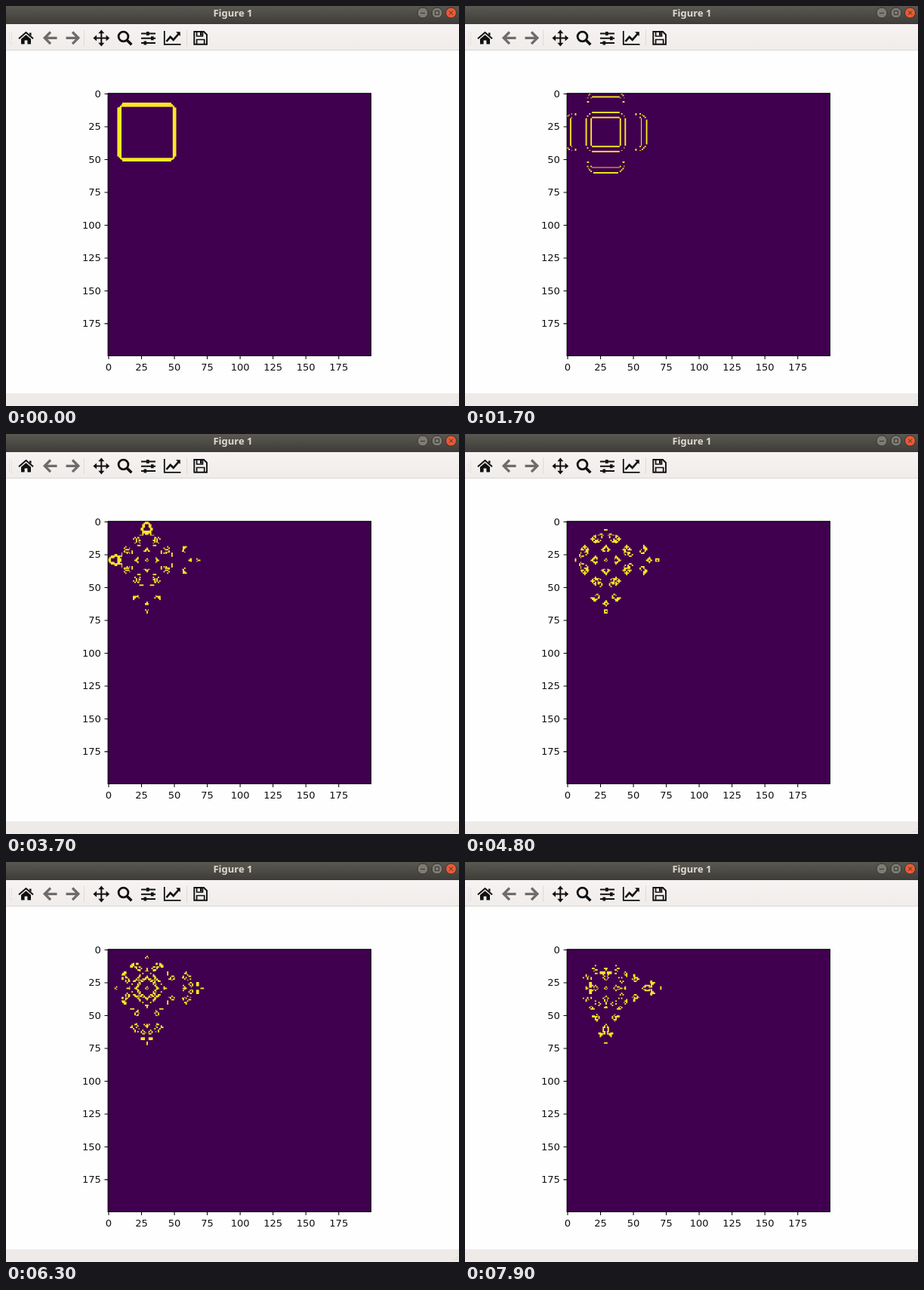
Recreate the animation shown at these times as an HTML page with a canvas. Size 600 by 530 pixels, loop 8000 ms.

```html
<!DOCTYPE html>
<html lang="en">
<head>
<meta charset="utf-8">
<title>Figure 1</title>
<style>
  html, body { margin: 0; width: 600px; height: 530px; overflow: hidden; background: #fefefe; }
  svg, canvas { position: absolute; left: 0; top: 0; display: block; }
  .title { font: bold 13px "Noto Sans", "Open Sans", sans-serif; fill: #dfdbd2; text-anchor: middle; }
  .tick { font: 13.08px "DejaVu Sans", sans-serif; fill: #111; }
</style>
</head>
<body>
<canvas id="plot" width="600" height="530"></canvas>
<svg id="ui" width="600" height="530" fill="none">
  <defs>
    <linearGradient id="bar" x2="0" y2="1">
      <stop stop-color="#5a5851"/><stop offset="1" stop-color="#3d3c38"/>
    </linearGradient>
    <linearGradient id="tools" x2="0" y2="1">
      <stop stop-color="#f6f3f2"/><stop offset="1" stop-color="#efecea"/>
    </linearGradient>
  </defs>
  <rect width="600" height="24" fill="url(#bar)"/>
  <text class="title" x="300.5" y="14">Figure 1</text>
  <g stroke="#35342f">
    <circle cx="552" cy="9" r="7" fill="#7d7b73"/>
    <circle cx="571" cy="9" r="7" fill="#7d7b73"/>
    <circle cx="589.5" cy="9" r="7" fill="#ea5a35"/>
    <path d="M549 9.5h6M568.5 6.5h5v5h-5zM587 6.5l5 5m0-5l-5 5"/>
  </g>
  <rect y="24" width="600" height="35" fill="url(#tools)"/>
  <path d="M0 58.5H600" stroke="#dad7d3"/>
  <path d="M103.5 32V53M239.5 32V53" stroke="#dedbd7"/>
  <path d="M4.5 34V52M7.5 35V52" stroke="#d0ccc7" stroke-dasharray="1 2"/>
  <path d="M67.5 42.3H51.5M59 34.5l-7.8 7.8l7.8 7.8M79.5 42.3H95.5M88 34.5l7.8 7.8l-7.8 7.8"
        stroke="#6c6c6c" stroke-width="3.3"/>
  <g stroke="#111" stroke-width="2">
    <path d="M17 43.3L26.5 35L36 43.3"/>
    <path d="M20 43.8L26.5 38.2L33 43.8V50.5H28.4V45.5H24.6V50.5H20zM31 35.5h2.5v4l-2.5-2z" fill="#111" stroke="none"/>
    <path d="M126.3 34V51M118 42.5H135"/>
    <path d="M126.3 31.6l4 4.6h-8zM126.3 53.4l4-4.6h-8zM115.4 42.5l4.6-4v8zM137.2 42.5l-4.6-4v8z" fill="#111" stroke="none"/>
    <circle cx="155.5" cy="40.5" r="6.4" stroke-width="2.8"/>
    <path d="M160 45l6.3 6.3" stroke-width="3.6"/>
    <path d="M179 36.5H198M179 42.7H198M179 49H198" stroke-width="1.9"/>
    <path d="M186 34h3.6v5H186zM192 40.2h3.6v5H192zM182.5 46.5h3.6v5h-3.6z" fill="#111" stroke="none"/>
    <path d="M209.8 33V50.8H231.5" stroke-width="1.8"/>
    <path d="M212.5 47l5.2-6 4 3.8 7-8" stroke-width="2.6"/>
    <path d="M225 34.3h5.8v5.8z" fill="#111" stroke="none"/>
    <path d="M249.3 34H262l4 4V50.8H249.3z" stroke-width="1.9"/>
    <path d="M252.6 34.5V40H260.5V34.5M252.6 50V44.5H262.7V50" stroke-width="1.7"/>
    <path d="M257 35h2.5v4H257z" fill="#111" stroke="none"/>
  </g>
  <rect y="513.3" width="600" height="17" fill="#edeae7"/>
  <path d="M597.5 523v6M594.5 526v3" stroke="#c9c5c0" stroke-dasharray="1 2"/>
</svg>
<script>
const SIZE = 200, LOOP = 8000, FRAME = 100;
const FIRST = 2, STEP = 190, LEAD = 100;
const BOX = { x: 135.1, y: 115.7, w: 348.3, h: 347.8 };
const DARK = '#40004f', LIGHT = '#fde725';

// Life on a bounded board, cells outside count as dead
function evolve(cells) {
  const next = new Uint8Array(SIZE * SIZE);
  for (let y = 0; y < SIZE; y++) {
    for (let x = 0; x < SIZE; x++) {
      let sum = 0;
      for (let v = Math.max(0, y - 1); v <= Math.min(SIZE - 1, y + 1); v++)
        for (let u = Math.max(0, x - 1); u <= Math.min(SIZE - 1, x + 1); u++)
          sum += cells[v * SIZE + u];
      const alive = cells[y * SIZE + x];
      next[y * SIZE + x] = sum === 3 || (alive && sum === 4) ? 1 : 0;
    }
  }
  return next;
}

const generation = time => FIRST + Math.floor((time + LEAD) / STEP);

// A filled square of 41 cells seeds the board
const start = new Uint8Array(SIZE * SIZE);
for (let y = 9; y < 50; y++) start.fill(1, y * SIZE + 9, y * SIZE + 50);
const history = [start];
for (let g = generation(LOOP); g > 0; g--) history.push(evolve(history[history.length - 1]));

function makeCanvas(size) {
  const c = document.createElement('canvas');
  c.width = c.height = size;
  return c.getContext('2d');
}
const board = makeCanvas(SIZE), scaled = makeCanvas(370);
const plot = document.getElementById('plot').getContext('2d');
scaled.imageSmoothingEnabled = false;

function draw(cells) {
  board.fillStyle = DARK;
  board.fillRect(0, 0, SIZE, SIZE);
  board.fillStyle = LIGHT;
  cells.forEach((on, i) => { if (on) board.fillRect(i % SIZE, Math.floor(i / SIZE), 1, 1); });
  scaled.drawImage(board.canvas, 0, 0, 370, 370);
  plot.drawImage(scaled.canvas, BOX.x, BOX.y, BOX.w, BOX.h);
}

const ui = document.getElementById('ui');
function add(tag, attrs, text) {
  const el = document.createElementNS('http://www.w3.org/2000/svg', tag);
  for (const k in attrs) el.setAttribute(k, attrs[k]);
  if (text !== undefined) el.textContent = text;
  ui.append(el);
}
const bottom = BOX.y + BOX.h;
add('rect', { x: BOX.x, y: BOX.y, width: BOX.w, height: BOX.h, stroke: '#000', 'stroke-width': 1.05 });
for (let n = 0; n < SIZE; n += 25) {
  const x = BOX.x + (n + .5) * BOX.w / SIZE, y = BOX.y + (n + .5) * BOX.h / SIZE;
  add('path', { d: `M${x} ${bottom}v4.6M${BOX.x} ${y}h-4.6`, stroke: '#000', 'stroke-width': 1.05 });
  add('text', { class: 'tick', x, y: 482.7, 'text-anchor': 'middle' }, n);
  add('text', { class: 'tick', x: 125.9, y: y + 4.3, 'text-anchor': 'end' }, n);
}

let shown = -1;
function tick(now) {
  const time = Math.floor((now % LOOP) / FRAME) * FRAME;
  const g = generation(time);
  if (g !== shown) draw(history[shown = g]);
  requestAnimationFrame(tick);
}
tick(performance.now());
</script>
</body>
</html>
```
